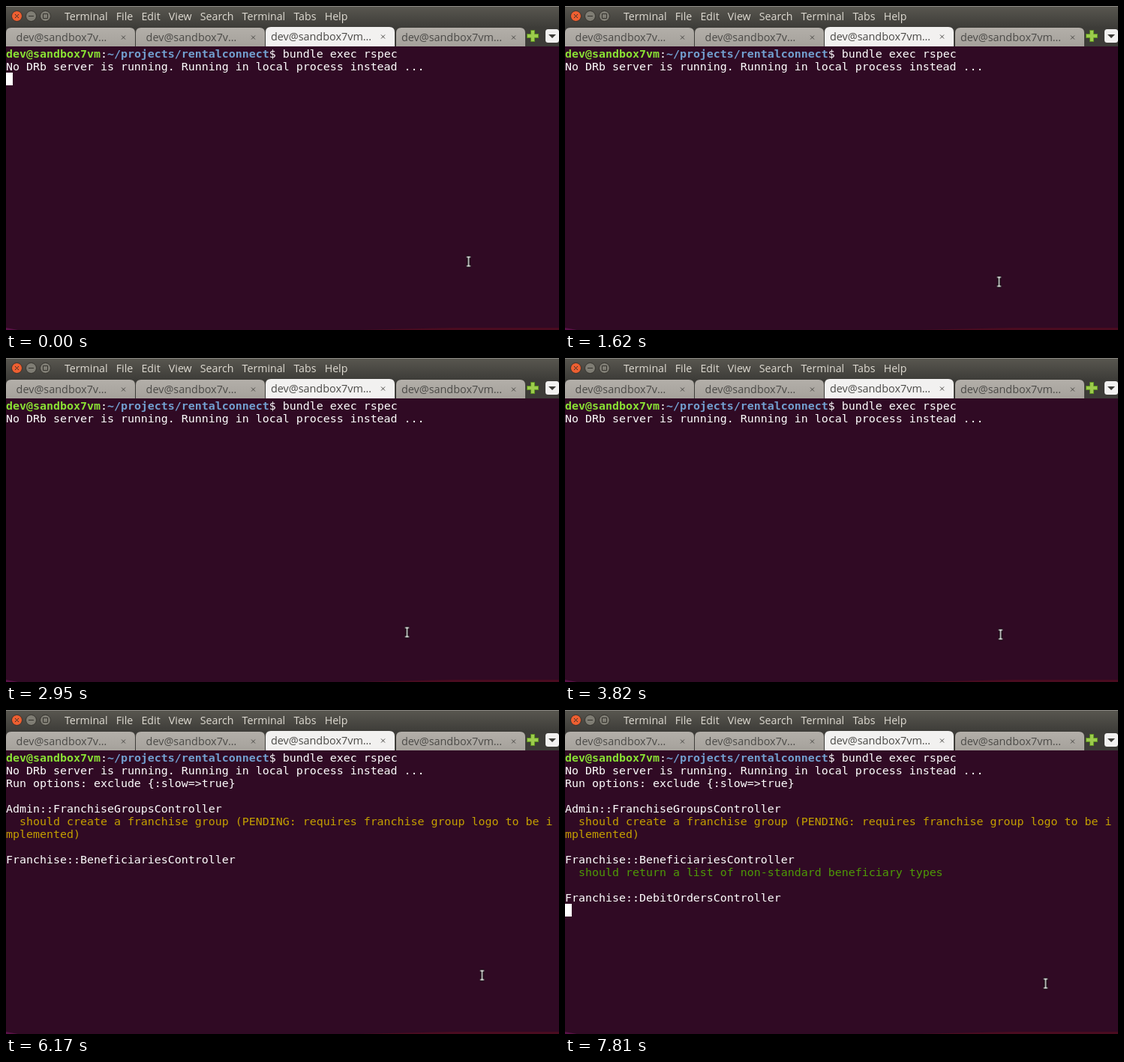
Write an HTML page that moves like this. It is 737x433 px and loops after 8 s.

```html
<!DOCTYPE html>
<html lang="en">
<head>
<meta charset="utf-8">
<title>Terminal test run</title>
<style>
  html, body { margin: 0; width: 100%; height: 100%; overflow: hidden; background: #300a24; }
  svg, .line, #caret { position: absolute; left: 0; top: 0; }
  text { font: 14.2px "Open Sans", "Noto Sans", sans-serif; fill: #dfdbd2; }
  .tab { font-size: 14.4px; fill: #4b4a47; text-anchor: middle; }
  .line { font: 14.949px/18px "DejaVu Sans Mono", monospace; white-space: pre; color: #fff; }
  .user { color: #8ae234; }
  .path { color: #729fcf; }
  .line .pending { color: #c4a000; }
  .line .passed { color: #4e9a06; }
  #caret { width: 9px; height: 17px; background: #fff; }
</style>
</head>
<body>
<svg width="737" height="433">
  <defs>
    <linearGradient id="bar" x2="0" y2="1">
      <stop stop-color="#595750"/><stop offset="1" stop-color="#3e3d39"/>
    </linearGradient>
    <linearGradient id="idle" x2="0" y2="1">
      <stop stop-color="#b3afa9"/><stop offset="1" stop-color="#a5a19b"/>
    </linearGradient>
  </defs>
  <path d="M470 433L598 430H737V433z" fill="#4a0c20"/>
  <path d="M0 430L16 433H0z" fill="#5a1248"/>
  <rect width="737" height="28" fill="url(#bar)"/>
  <rect width="737" height="1" fill="#8c8a84"/>
  <rect y="28" width="737" height="26" fill="#3d3c38"/>

  <g stroke="#33312c" fill="#7f7d74">
    <circle cx="14.5" cy="13.5" r="7" fill="#ee5f31"/>
    <circle cx="33.5" cy="13.5" r="7"/>
    <circle cx="52.5" cy="13.5" r="7"/>
    <path d="M12 11l5 5m0-5l-5 5M30 13.5h7M49.5 10.5h6v6h-6z" fill="none"/>
  </g>

  <text id="menu" x="78" y="19"></text>
  <g id="tabs"></g>

  <path d="M699.5 32.500h5v5h5v5h-5v5h-5v-5h-5v-5h5z" fill="#9ccb4c" stroke="#5c9020"/>
  <rect x="719" y="31" width="18" height="18" rx="3.500" fill="#f2f1f0"/>
  <path d="M723 38h10l-5 5z" fill="#3c3b37"/>
</svg>

<div id="screen">
  <div class="line"><b class="user">dev@sandbox7vm</b>:<b class="path">~/projects/rentalconnect</b>$ bundle exec rspec</div>
</div>
<div id="caret"></div>
<svg id="pointer" width="12" height="20" viewBox="-6 -10 12 20" fill="none">
  <path id="beam" d="M-2.500 -6H2.500M0 -6V6M-2.500 6H2.500" stroke="#000" stroke-width="3"/>
  <use href="#beam"/>
  <path d="M-2.500 -6H2.500M0 -6V6M-2.500 6H2.500" stroke="#fff" stroke-width="1.400"/>
</svg>

<script>
const LOOP = 8000, TICK = 147, ROW = 17, TOP = 55;
const $ = id => document.getElementById(id);

function add(parent, tag, attrs, content = '') {
  const node = document.createElementNS(parent.namespaceURI, tag);
  for (const key in attrs) node.setAttribute(key, attrs[key]);
  node.textContent = content;
  return parent.appendChild(node);
}

// The screen refreshes once per tick; each pose holds until the next tick.
function play(node, pose) {
  const frames = [];
  for (let tick = 0; tick * TICK < LOOP; tick++) {
    const offset = Math.max(0, (tick - 0.1) * TICK / LOOP);
    frames.push({ offset, easing: 'step-end', ...pose(tick) });
  }
  frames.push({ ...frames[frames.length - 1], offset: 1 });
  node.animate(frames, { duration: LOOP, iterations: Infinity });
}

const move = (x, y) => ({ transform: `translate(${x}px, ${y}px)` });
const show = visible => ({ opacity: visible ? 1 : 0 });

'Terminal File Edit View Search Terminal Tabs Help'.split(' ').forEach((label, i) =>
  add($('menu'), 'tspan', { dx: i ? 11.2 : 0 }, label));

for (let i = 0; i < 4; i++) {
  const active = i === 2, x = Math.round(i * 173.2), y = active ? 28 : 29;
  add($('tabs'), 'path', {
    d: `M${x} 54V${y + 7}q0 -7 7 -7h158q7 0 7 7V54z`,
    fill: active ? '#f2f1f0' : 'url(#idle)'
  });
  add($('tabs'), 'text', { class: 'tab', x: x + 74, y: y + 18 },
    i < 2 ? 'dev@sandbox7v…' : 'dev@sandbox7vm…');
  add($('tabs'), 'path', { d: `M${x + 154} ${y + 10.5}l5 5m0 -5l-5 5`, stroke: '#4b4a47' });
}

// [first tick, text, style], one entry per screen row after the prompt
const output = [
  [0, 'No DRb server is running. Running in local process instead ...'],
  [36, 'Run options: exclude {:slow=>true}'],
  [37, ''],
  [37, 'Admin::FranchiseGroupsController'],
  [42, '  should create a franchise group (PENDING: requires franchise group logo to be i', 'pending'],
  [42, 'mplemented)', 'pending'],
  [42, ''],
  [42, 'Franchise::BeneficiariesController'],
  [49, '  should return a list of non-standard beneficiary types', 'passed'],
  [49, ''],
  [49, 'Franchise::DebitOrdersController']
];
for (const [start, label, style = ''] of output) {
  const line = add($('screen'), 'div', { class: 'line' });
  add(line, 'span', { class: style }, label);
  play(line, tick => show(tick >= start));
}
[...$('screen').children].forEach((line, row) => line.style.top = TOP + row * ROW + 'px');

// The caret blinks every four ticks on the row below the output.
play($('caret'), tick => {
  const row = 1 + output.filter(([start]) => start <= tick).length;
  return { ...show(Math.floor((tick + 3) / 4) % 2 === 0), ...move(0, TOP + row * ROW) };
});

// Pointer stops: [tick, x, y]
const stops = [
  [0, 616, 341], [2, 629, 354], [5, 629, 354], [12, 569, 370], [14, 534, 366],
  [21, 534, 366], [26, 580, 369], [30, 604, 364], [33, 606, 362], [36, 606, 362],
  [39, 634, 354], [46, 634, 354], [50, 645, 360], [52, 645, 360], [53, 640, 365]
];
play($('pointer'), tick => {
  const next = stops.findIndex(([at]) => at > tick);
  const to = stops.at(next), from = next < 0 ? to : stops[next - 1];
  const part = next < 0 ? 1 : (tick - from[0]) / (to[0] - from[0]);
  const mix = axis => Math.round(from[axis] + (to[axis] - from[axis]) * part);
  return move(mix(1) - 5.5, mix(2) - 9.5);
});
</script>
</body>
</html>
```
